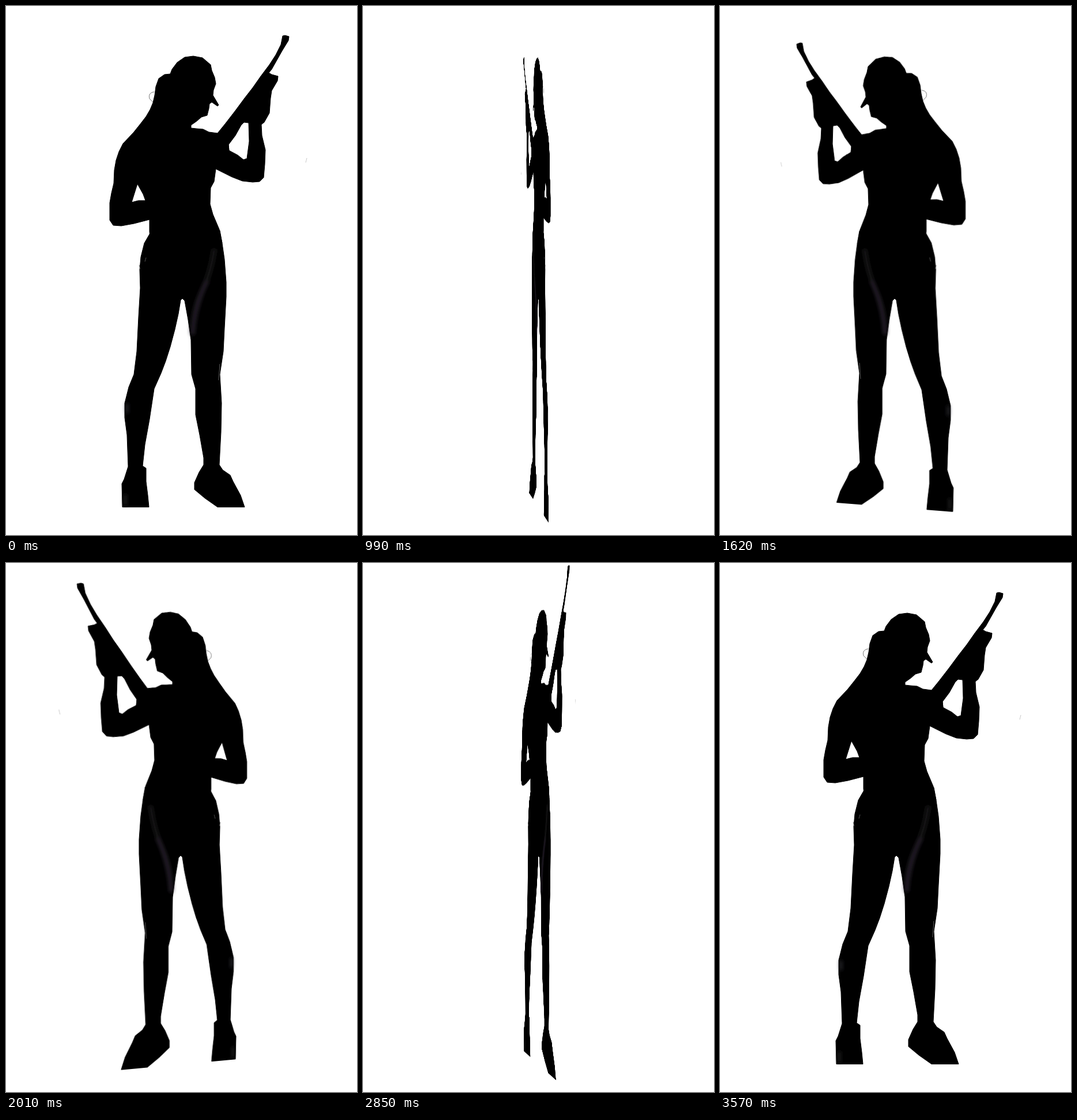
An HTML page for the animation above (3.6 s loop, 609x919 px).

```html
<!DOCTYPE html>
<html lang="en">
<head>
<meta charset="utf-8">
<title>Turning silhouette</title>
<style>
  html, body { margin: 0; width: 100%; height: 100%; overflow: hidden; background: #fff; }
  #stage { position: absolute; inset: 0; overflow: hidden; contain: strict; }
  #figure { position: absolute; left: 0; top: 0; display: block; }
</style>
</head>
<body>
<div id="stage">
<svg id="figure" width="609" height="919" viewBox="0 0 609 919">
  <defs>
    <filter id="soft" x="-100%" y="-20%" width="300%" height="140%">
      <feGaussianBlur stdDeviation="3"/>
    </filter>
    <filter id="edge">
      <feGaussianBlur stdDeviation=".6"/>
    </filter>
  </defs>

  <g filter="url(#edge)" fill-rule="evenodd" stroke="#000" stroke-linejoin="round">
    <!-- head, torso and bent arm -->
    <path d="M325 87 341 90 355 102 357 112 362 124 364 135 360 146 359 155 369 172 367 174
      357 167 353 170 352 178 349 190 339 193 331 200 321 207 321 212 330 213 342 214 352 219 367 221 386 241 387 252
      364 283 361 305 355 316 354 344 359 362 370 388 375 412 251 412 249 392 249 371 222 378 200 382 186 381
      180 372 180 342 183 325 187 308 188 285 191 268 196 253 203 239 221 220 233 205 243 192 250 180
      255 168 258 155 260 140 265 126 275 119 285 118 288 110 297 98 310 89Z
      M228 309 218 341 230 338 242 338 238 327 233 318Z"/>

    <!-- rifle and raised arm -->
    <path d="M480 52 484 51 491 53 490 60 479 78 461 110 456 116 461 119 472 122 471 130 461 147
      459 160 457 186 448 202 443 206 444 225 450 250 449 275 447 298 440 305 428 306 410 304 392 297 364 283
      340 260 367 221 380 205 397 183 414 160 428 142 442 122 457 102 468 85 477 67Z
      M386 241 398 225 408 207 413 202 421 203 422 235 418 265 412 267 402 259 387 251Z"/>

    <!-- hips and legs -->
    <path d="M251 393 371 390 375 412 379 440 382 480 382 505 379 560 377 600 371 640 374 690 373 740 370 797
      376 806 389 815 394 826 407 850 414 870.5 367 870.5 345 855 327 840 327 828 335 810 343 797 343 785 336 745
      329 710 329 665 322 640 321 580 316 545 310 512 306 508 303 511 299 535 293 562 285 592 277 617 269 638
      257 665 249 718 241 762 237 799 243 803 243 826 246 850 248 870.5 202 870.5 201 830 205 822 212 800
      210 745 206 715 206 690 213 662 222 640 227 600 230 540 233 490 232 458 234 436 240 412Z"/>
  </g>

  <!-- faint sheen -->
  <g filter="url(#soft)" fill="none" stroke-linecap="round">
    <path d="M361 425Q355 465 340 495T324 568" stroke="#141215" stroke-width="8"/>
    <path d="M348 480Q328 520 324 568" stroke="#231f25" stroke-width="7"/>
    <path d="M210 692V706" stroke="#2c2c30" stroke-width="4"/>
    <path d="M207 850V866" stroke="#282828" stroke-width="4"/>
  </g>

  <!-- stray hair and edge marks -->
  <g fill="none" stroke="#555" stroke-width=".8">
    <path d="M257 149Q246 151 249 161L255 167"/>
    <path d="M371 622 369 650" stroke="#777"/>
    <path d="M243 437 241 444M231 450 233 457" stroke="#666"/>
    <path d="M522 264 520 272" stroke="#bbb"/>
  </g>
</svg>
</div>
<script>
  const LOOP = 3600, STEPS = 120;
  const turn = deg => `perspective(1700px) rotateY(${deg}deg)`;
  const last = (STEPS - 1) / STEPS;

  // 3 degrees per step; the last step already shows the front view
  document.getElementById('figure').animate([
    { offset: 0, transform: turn(0), easing: `steps(${STEPS - 1})` },
    { offset: last, transform: turn(360 * last) },
    { offset: last, transform: turn(360) },
    { offset: 1, transform: turn(360) }
  ], { duration: LOOP, iterations: Infinity });
</script>
</body>
</html>
```
